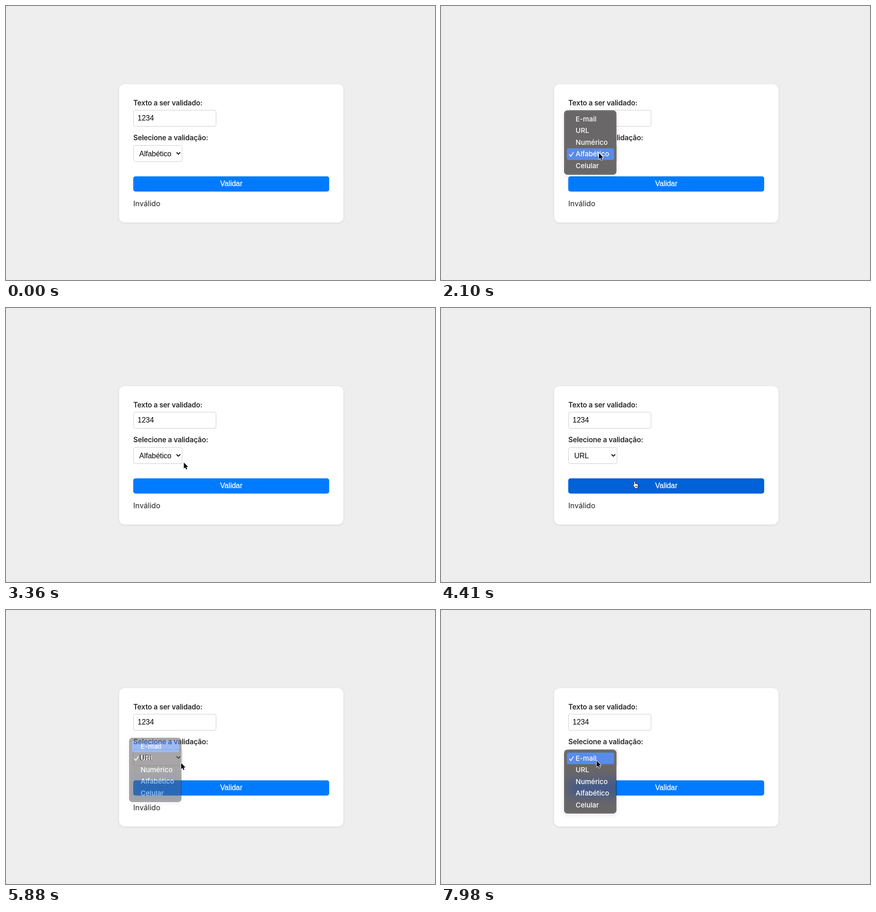
Recreate the animation shown at these times as an HTML page. Size 937 by 598 pixels, loop 8000 ms.

```html
<!DOCTYPE html>
<html lang="pt">
<head>
<meta charset="utf-8">
<title>Validador</title>
<style>
  html, body { margin: 0; width: 937px; height: 598px; overflow: hidden; background: #999; }
  svg { position: absolute; left: 0; top: 0; }
  text { font: 16px "Liberation Sans", Arial, sans-serif; }
  .label { font: 600 15.5px Inter, sans-serif; letter-spacing: -.18px; fill: #282828; }
  .result { font: 16.2px Inter, sans-serif; fill: #222; }
  .card { fill: #fff; filter: drop-shadow(0 1px 2px rgba(0, 0, 0, .1)); }
  .field { fill: #fff; stroke: #ccc; }
  .field.focus { stroke: #007bff; }
  #menu {
    position: absolute; left: 270px; width: 112px; height: 137.5px; border-radius: 6px;
    background: #6a6768;
    box-shadow: 0 0 0 1px rgba(20, 20, 20, .85), 0 3px 8px 3px rgba(0, 0, 0, .08);
  }
  #menu svg { border-radius: 6px; box-shadow: inset 0 0 0 1px rgba(255, 255, 255, .22); }
  #menu text { font: 500 15.05px Inter, sans-serif; fill: #fff; }
  #glow { fill: #3e588e; filter: blur(13px); }
</style>
</head>
<body>
<svg width="937" height="598">
  <rect width="937" height="598" rx="2.5" fill="#eee"/>
  <rect class="card" x="247" y="170.5" width="490" height="302" rx="12"/>
  <text class="label" x="278" y="216.5">Texto a ser validado:</text>
  <rect class="field" id="input" x="278.4" y="227.3" width="180.4" height="35.3" rx="4"/>
  <text x="287.5" y="250">1234</text>
  <text class="label" x="278" y="293">Selecione a validação:</text>
  <rect class="field" id="select" x="278.4" y="304.3" width="106.3" height="35.3" rx="4"/>
  <text id="value" x="291" y="327.5"></text>
  <path d="M372.5 319.5l4 4 4-4" fill="none" stroke="#000" stroke-width="1.9"/>
  <rect id="button" x="277.9" y="371.7" width="428" height="33.3" rx="5"/>
  <text x="492" y="393" text-anchor="middle" fill="#fff" stroke="#fff" stroke-width=".3">Validar</text>
  <text class="result" x="278" y="437">Inválido</text>
</svg>

<div id="menu">
  <svg width="112" height="137.5">
    <rect id="glow" x="8" width="120"/>
    <rect id="highlight" x="5" width="103" height="25.5" rx="4" fill="#598be9"/>
    <path id="check" d="M10.5 19l3 3.6 5.5-8.4" fill="none" stroke="#fff" stroke-width="1.7"
      stroke-linecap="round" stroke-linejoin="round"/>
    <g id="items"></g>
  </svg>
</div>

<svg width="937" height="598">
  <g id="cursor">
    <g id="ring" fill="none">
      <circle stroke="#fff" stroke-width="5.6"/>
      <circle stroke="#000" stroke-width="3.2"/>
    </g>
    <path id="arrow" d="M0 0V13.4l3-2.8 2 4.7 2.2-.9-2-4.6h4.2z" stroke="#fff" stroke-width="1.8"
      paint-order="stroke" stroke-linejoin="round"/>
    <g id="hand" transform="translate(-3.6 -.5)" fill="#fff" stroke="#000" stroke-linejoin="round">
      <path d="M3.4 .5C4.4 .5 5 1.2 5 2.1V6c.3-.5 1.9-.5 2.2.4.6-.5 1.9-.3 2.1.6.7-.4 2.1 0 2.1 1.3v3.2
        c0 2-1 2.7-1.2 5H4.6c-.5-2-2-3.1-3-4.9C.9 10.3-.3 9.2.2 8.4.8 7.5 1.6 8 2 8.6V2C2 1.1 2.6.5 3.4.5z"/>
      <path d="M5.5 10.2v3.6M7.3 10.2v3.6M9.1 10.2v3.6" stroke-width=".8"/>
    </g>
  </g>
</svg>

<script>
const LOOP = 8000, STEP = 70, TRAVEL = 490, PRESS = 140, CLOSE = 280, ROW = 25.5;
const options = ["E-mail", "URL", "Numérico", "Alfabético", "Celular"];

// The pointer leaves at start, rests at (x, y) and acts there at the given time
const steps = [
  { start: 280, at: 490, x: 409, y: 417, action: "enter" },
  { start: 840, at: 1330, x: 352, y: 325, action: "activate" },
  { start: 1470, at: 1680, x: 345, y: 321, action: "open" },
  { start: 2100, at: 2940, x: 326, y: 270, action: "pick", option: 1 },
  { start: 3080, at: 3920, x: 432, y: 384, action: "submit" },
  { start: 4340, at: 5040, x: 340, y: 323, action: "open" },
  { start: 5250, at: 5530, x: 325, y: 297, action: "pick", option: 0 },
  { start: 5670, at: 6790, x: 465, y: 387, action: "submit" },
  { start: 7280, at: 7840, x: 340, y: 329, action: "open" }
];

const $ = id => document.getElementById(id);
const clamp = (v, lo, hi) => Math.max(lo, Math.min(hi, v));
const mix = (a, b, u) => a + (b - a) * u;
const ease = u => mix(u, u * u * (3 - 2 * u), .5);
const show = (el, on) => el.style.display = on ? "" : "none";

$("items").innerHTML = options.map((name, i) =>
  `<text x="24" y="${22.8 + i * ROW}">${name}</text>`).join("");

// Replays the steps up to time t
function stateAt(t) {
  const s = { x: 463, y: 552, value: 3, focus: "", active: false, pressed: false, menu: null };
  for (const { start, at, x, y, action, option } of steps) {
    if (t < start) break;
    const u = ease(clamp((t - start) / Math.min(TRAVEL, at - start), 0, 1));
    s.x = mix(s.x, x, u);
    s.y = mix(s.y, y, u);
    if (t < at) break;

    if (action == "enter") continue;
    s.active = true;
    s.focus = action == "activate" ? "input" : "";
    s.pressed = action != "activate" && t < at + PRESS;
    if (action == "open") s.menu = { selected: s.value, opacity: 1 };
    if (action == "pick") {
      const left = at + PRESS + CLOSE - t;
      s.menu.picked = option;
      s.menu.opacity = clamp(left / 120, 0, 1);
      if (left <= 0) s.menu = null;
      if (left < 0) Object.assign(s, { value: option, focus: "select" });
    }
  }
  return s;
}

function drawMenu({ selected, picked, opacity }, y) {
  const top = 305.5 - selected * ROW;
  const row = picked ?? clamp(Math.floor((y - top - 5) / ROW), 0, options.length - 1);
  $("menu").style.top = top + "px";
  $("menu").style.opacity = opacity;
  $("highlight").setAttribute("y", 5 + row * ROW);
  $("check").setAttribute("transform", `translate(0 ${selected * ROW})`);
  // Blurred button behind the panel
  $("glow").setAttribute("y", 372 - top);
  $("glow").setAttribute("height", clamp(top + 137 - 372, 0, 33));
}

function draw(now) {
  const t = Math.floor(now % LOOP / STEP) * STEP;
  const { x, y, value, focus, active, pressed, menu } = stateAt(t);
  const hover = active && y >= 372 && y < 405;

  $("value").textContent = options[value];
  for (const id of ["input", "select"]) $(id).classList.toggle("focus", focus == id);
  $("button").setAttribute("fill", hover ? "#0061d8" : "#007bff");
  show($("menu"), menu);
  if (menu) drawMenu(menu, y);

  show($("cursor"), t >= steps[0].start);
  $("cursor").setAttribute("transform", `translate(${x} ${y})`);
  show($("hand"), hover);
  show($("arrow"), !hover);
  show($("ring"), pressed);
  for (const circle of $("ring").children) circle.setAttribute("r", hover ? 28.5 : 20);
}

const start = performance.now();
(function tick() {
  draw(performance.now() - start);
  requestAnimationFrame(tick);
})();
</script>
</body>
</html>
```
